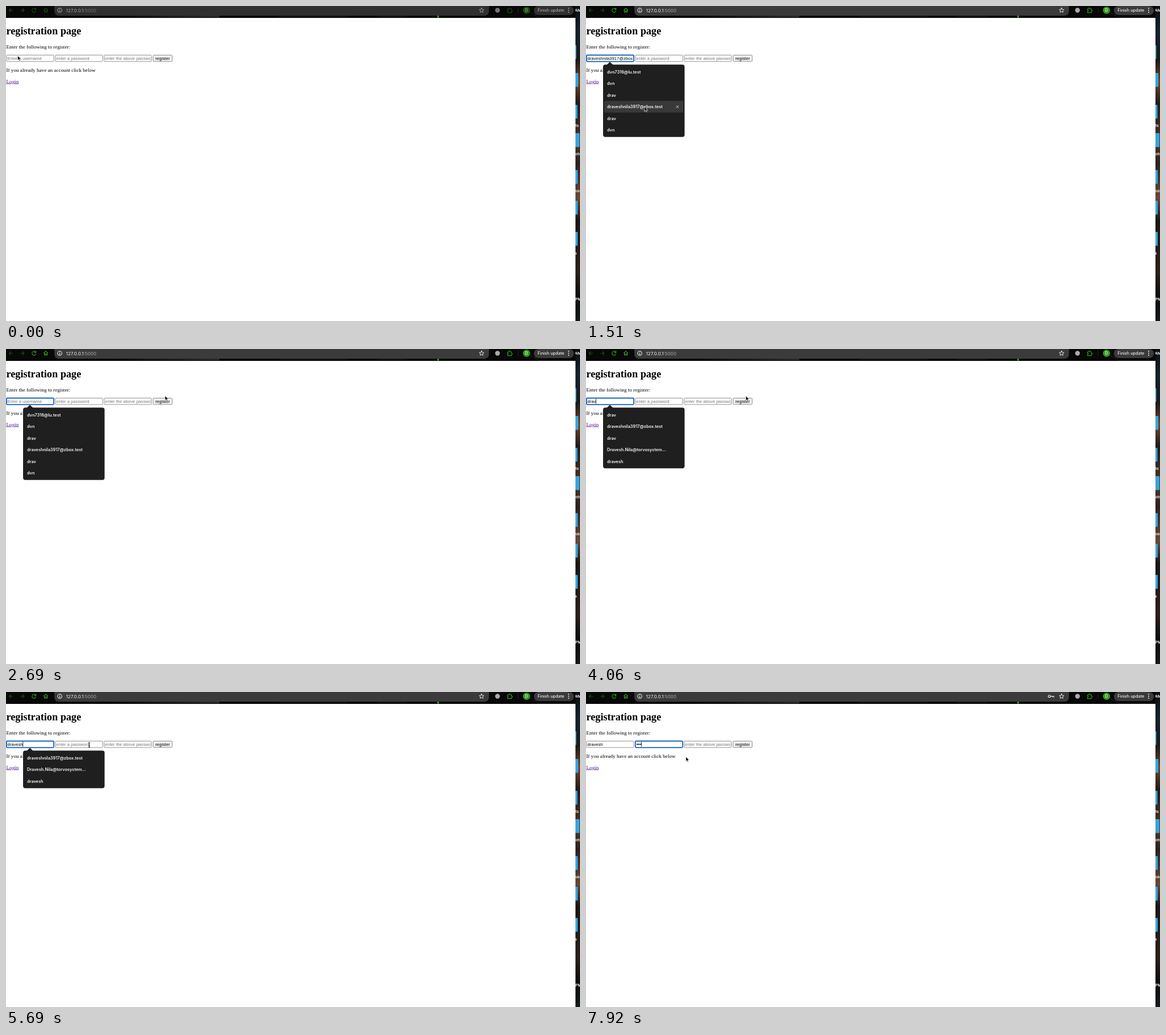
Recreate the animation shown at these times as an HTML page. Size 1009 by 555 pixels, loop 8000 ms.

```html
<!DOCTYPE html>
<html lang="en">
<head>
<meta charset="utf-8">
<title>Registration page</title>
<style>
  html, body { margin: 0; width: 100%; height: 100%; overflow: hidden; background: #fff; }
  #stage { display: block; width: 1009px; height: 555px; --bar: #3b3b3b; --green: #319d19; --ink: #f1f1f1; --soft: #aaa; }
  #stage.idle { --bar: #303030; --green: #174d0c; --ink: #a5a5a5; --soft: #757575; }
  text { white-space: pre; }
  .serif { font: 9.15px "Liberation Serif", Times, serif; }
  .title { font: bold 18.2px "Liberation Serif", Times, serif; }
  .field { font: 7.6px "Liberation Sans", Arial, sans-serif; }
  .hint { fill: #757575; }
  .ui { font: 500 7.3px Inter, sans-serif; fill: var(--ink); }
  .url { font: 8.1px Inter, sans-serif; }
  .row { font: 600 7.3px Inter, sans-serif; fill: #f5f5f5; }
  .label { font: 600 6.6px Inter, sans-serif; fill: #fff; }
  .box { fill: #fff; stroke: #767676; stroke-width: .8; }
  .box.on { stroke: #1764c8; stroke-width: 1.8; }
  .icon { fill: none; stroke: var(--green); stroke-width: 1.1; stroke-linecap: round; stroke-linejoin: round; }
  .light { stroke: var(--ink); }
</style>
</head>
<body>
<svg id="stage" viewBox="0 0 1009 555">
  <defs>
    <linearGradient id="desk" x2="0" y2="1">
      <stop offset="0" stop-color="#0b0d10"/>
      <stop offset=".08" stop-color="#16222b"/>
      <stop offset=".17" stop-color="#1b1a19"/>
      <stop offset=".24" stop-color="#6b452d"/>
      <stop offset=".31" stop-color="#201a18"/>
      <stop offset=".43" stop-color="#513526"/>
      <stop offset=".5" stop-color="#2a2220"/>
      <stop offset=".61" stop-color="#6a4834"/>
      <stop offset=".68" stop-color="#1a1614"/>
      <stop offset=".84" stop-color="#2d201a"/>
      <stop offset=".92" stop-color="#0c0d0e"/>
      <stop offset="1" stop-color="#14191b"/>
    </linearGradient>
    <linearGradient id="edge">
      <stop offset="0" stop-color="#090909"/>
      <stop offset="1" stop-color="#2b2b2b"/>
    </linearGradient>
  </defs>

  <rect width="1009" height="555" fill="#fff"/>
  <rect x="1001" width="8" height="555" fill="url(#desk)"/>
  <g id="folders" fill="#3aa3dc"></g>
  <g class="label">
    <text x="1000" y="9.5">AM</text>
    <text x="1001" y="213.2">ts</text>
    <text x="1001" y="263.2">ots</text>
    <text x="1001" y="328.2">us</text>
    <text x="1000" y="437.5">s</text>
    <text x="1001" y="519.2">PM</text>
  </g>

  <!-- toolbar -->
  <rect width="1001" height="21" fill="#070807"/>
  <rect x="183" y="16" width="192" height="4" fill="url(#edge)"/>
  <path d="M480 18.5h120M652 18.5h53" stroke="#141b12" stroke-width="2"/>
  <rect x="758.3" y="16.5" width="2.6" height="4" fill="#3fae2a"/>
  <path d="M920 10L936 20H1001" fill="none" stroke="#232323"/>
  <path d="M85 0H849V8.500Q849 17 840.500 17H93.500Q85 17 85 8.500Z" fill="var(--bar)"/>
  <path d="M936 0H990Q998 1 998 8T990 16H936Q928 15 928 8T936 0Z" fill="var(--bar)"/>
  <g class="icon">
    <path d="M12 7.500H5.500M8.500 4.500l-3 3 3 3M25.500 7.500H32M29 4.500l3 3-3 3" stroke="#194f0e"/>
    <path d="M52.300 5.800A3.500 3.500 0 1 0 52.600 8.700M52.700 3.700V6.300H50"/>
    <path d="M66.500 7L70 4l3.500 3M67.500 6.500V11H69V8.500H71V11h1.500V6.500"/>
    <path d="M881.500 5h2.200q0-1.800 1.200-1.800T886 5h2.500v2.200q1.700 0 1.700 1.200t-1.700 1.200v2h-7V9.500q1.600 0 1.600-1.200t-1.600-1.200Z"/>
    <g class="light">
      <circle cx="94.500" cy="7.500" r="3.700"/>
      <path d="M94.500 7.300v2.100M94.500 5.500v.1"/>
      <path d="M836 3.300l1.200 2.700 3 .3-2.300 2 .7 2.900-2.600-1.500-2.600 1.500.7-2.900-2.300-2 3-.3Z" stroke-width=".9"/>
    </g>
    <g id="key" class="light">
      <circle cx="814.500" cy="7.500" r="2"/>
      <path d="M816.700 7.500H822.300V9.300M820 7.500v1.500"/>
    </g>
  </g>
  <circle cx="864" cy="7.500" r="4.200" fill="var(--soft)"/>
  <path d="M900 2.500v10" stroke="#263422" stroke-width=".8"/>
  <circle cx="915" cy="7.500" r="6.300" fill="var(--green)"/>
  <text class="ui" x="912.300" y="10">D</text>
  <text class="ui" x="934.500" y="10.200">Finish update</text>
  <g fill="var(--ink)">
    <circle cx="989" cy="4" r="1"/><circle cx="989" cy="7.500" r="1"/><circle cx="989" cy="11" r="1"/>
  </g>
  <text class="ui url" x="105.500" y="10.500">127.0.0.1<tspan fill="var(--soft)">:5000</tspan></text>

  <!-- page -->
  <text class="title" x=".5" y="49.500">registration page</text>
  <text class="serif" x=".5" y="75">Enter the following to register:</text>
  <text class="serif" x=".5" y="116">If you already have an account click below</text>
  <text class="serif" x=".5" y="135.500" fill="#551a8b" text-decoration="underline">Login</text>
  <g class="field">
    <rect id="nameBox" class="box" x="1" y="86.500" width="83" height="11.300" rx="1.200"/>
    <rect id="passBox" class="box" x="86.800" y="86.500" width="83" height="11.300" rx="1.200"/>
    <rect class="box" x="172.500" y="86.500" width="83" height="11.300" rx="1.200"/>
    <rect x="258.400" y="86.500" width="33.800" height="11.300" rx="1.800" fill="#efefef" stroke="#767676" stroke-width=".8"/>
    <svg x="2" y="87" width="80.500" height="10.500"><text id="name" x=".5" y="7.700"></text></svg>
    <text id="passHint" class="hint" x="88.300" y="94.700">enter a password</text>
    <svg x="173.500" y="87" width="80.500" height="10.500"><text class="hint" x=".5" y="7.700">enter the above password</text></svg>
    <text x="262.600" y="94.700">register</text>
  </g>
  <g id="dots"></g>
  <rect id="caret" y="87.500" width=".8" height="9" fill="#000"/>

  <!-- suggestions -->
  <g id="menu">
    <path d="M36 104L42 98.500L48 104Z" fill="#1f1f1f"/>
    <rect id="panel" x="30" y="103.300" width="143.300" rx="4" fill="#1f1f1f"/>
    <g id="hover">
      <rect x="32" width="139" height="20.400" rx="1.500" fill="#393939"/>
      <path d="M158.500 8l4.400 4.400M162.900 8l-4.400 4.400" stroke="#e6e6e6" stroke-width=".9"/>
    </g>
    <g id="rows"></g>
  </g>

  <path id="arrow" d="M0 0V8.200L1.900 6.500L3.200 9.400L4.600 8.800L3.300 6H5.900Z" fill="#000" stroke="#fff" stroke-width=".7"/>
  <path id="beam" d="M-1.700 -4.500Q0 -4.500 0 -3Q0 -4.500 1.700 -4.500M0 -3V3M-1.700 4.500Q0 4.500 0 3Q0 4.500 1.700 4.500M-1 1H1" fill="none" stroke="#000" stroke-width=".9"/>
</svg>
<script>
  const LOOP = 8000, ROW = 20.45, TOP = 106;
  const $ = id => document.getElementById(id);
  const NS = "http://www.w3.org/2000/svg";

  function add(parent, tag, attrs, text = "") {
    const el = document.createElementNS(NS, tag);
    for (const k in attrs) el.setAttribute(k, attrs[k]);
    el.textContent = text;
    parent.append(el);
    return el;
  }

  // Each track lists [start time, value...]; a value holds until the next one.
  const at = (track, t) => track.findLast(step => step[0] <= t);

  const USER = "dravesh";
  const MAIL = "draveshnila3917@zbox.test";
  const WORK = "Dravesh.Nila@torvosystem...";
  const LISTS = {
    all: ["dvn7316@lu.test", "dvn", "drav", MAIL, "drav", "dvn"],
    some: ["drav", MAIL, "drav", WORK, USER],
    few: [MAIL, WORK, USER],
    none: []
  };

  const lists = [[0, "none"], [1060, "all"], [3620, "some"], [4210, "few"], [5840, "none"]];
  const typed = [[0, 0], [3440, 1], [3620, 2], [3920, 3], [4060, 4], [4210, 5], [4350, 6], [4650, 7]];
  const bullets = [[0, 0], [7620, 1], [7770, 2], [7920, 3]];
  const carets = [[0, false], [910, true], [1960, false], [2990, true], [6290, false], [6730, true], [7330, false], [7620, true]];
  const pointer = [
    [0, 20.5, 87.5], [180, 21, 88], [480, 23, 92, "beam"], [620, 24.7, 92.5, "beam"],
    [1210, 48, 128], [1360, 88, 160], [1510, 102.5, 177.3],
    [1960, 105, 191], [2110, 140, 180], [2260, 203, 148], [2400, 245, 112], [2540, 270, 91],
    [2690, 279.5, 82.3], [2840, 281, 82.8],
    [4800, 286, 86], [4950, 274, 98], [5100, 238, 105], [5250, 200, 97, "beam"],
    [5390, 167, 95, "beam"], [5540, 151, 93.5, "beam"], [5690, 146.3, 93.3, "beam"],
    [5990, 175.5, 114]
  ];

  [[69, 1.5], [118, 5], [174, 3.5], [224, 7], [289, 4], [343, 4], [398, 4]].forEach(([y, w]) =>
    add($("folders"), "rect", { x: 1001, y, width: w, height: 24.5, rx: 1 }));
  const rows = LISTS.all.map((_, i) =>
    add($("rows"), "text", { class: "row", x: 37, y: TOP + ROW * i + 12.8 }));
  const dots = [0, 1, 2].map(i =>
    add($("dots"), "circle", { cx: 90.1 + 2.8 * i, cy: 92.2, r: 1.15 }));

  const show = (el, on) => el.setAttribute("visibility", on ? "inherit" : "hidden");

  function draw(t) {
    const list = LISTS[at(lists, t)[1]];
    const [, x, y, shape = "arrow"] = at(pointer, t);
    const index = Math.floor((y - TOP) / ROW);
    const over = shape === "arrow" && x > 30 && x < 173 && index >= 0 && index < list.length;

    $("stage").classList.toggle("idle", t < 180);

    show($("menu"), list.length);
    $("panel").setAttribute("height", Math.max(0, ROW * list.length + 4.8));
    rows.forEach((row, i) => { row.textContent = list[i] || ""; });
    show($("hover"), over);
    $("hover").setAttribute("transform", `translate(0 ${TOP + ROW * index})`);

    const value = over ? list[index] : USER.slice(0, at(typed, t)[1]);
    $("name").textContent = value || "Enter a username";
    $("name").classList.toggle("hint", !value);

    const count = at(bullets, t)[1];
    const inPass = t >= 5840;
    $("nameBox").classList.toggle("on", t >= 910 && !inPass);
    $("passBox").classList.toggle("on", inPass);
    show($("passHint"), !count);
    dots.forEach((dot, i) => show(dot, i < count));
    show($("key"), count);

    const nameEnd = 2.4 + (value ? $("name").getComputedTextLength() : 0);
    $("caret").setAttribute("x", inPass ? 88.2 + 2.9 * count : nameEnd);
    show($("caret"), at(carets, t)[1] && !over);

    for (const id of ["arrow", "beam"]) {
      show($(id), id === shape);
      $(id).setAttribute("transform", `translate(${x} ${y})`);
    }
  }

  const start = performance.now();
  function tick() {
    draw((performance.now() - start) % LOOP);
    requestAnimationFrame(tick);
  }
  tick();
</script>
</body>
</html>
```
